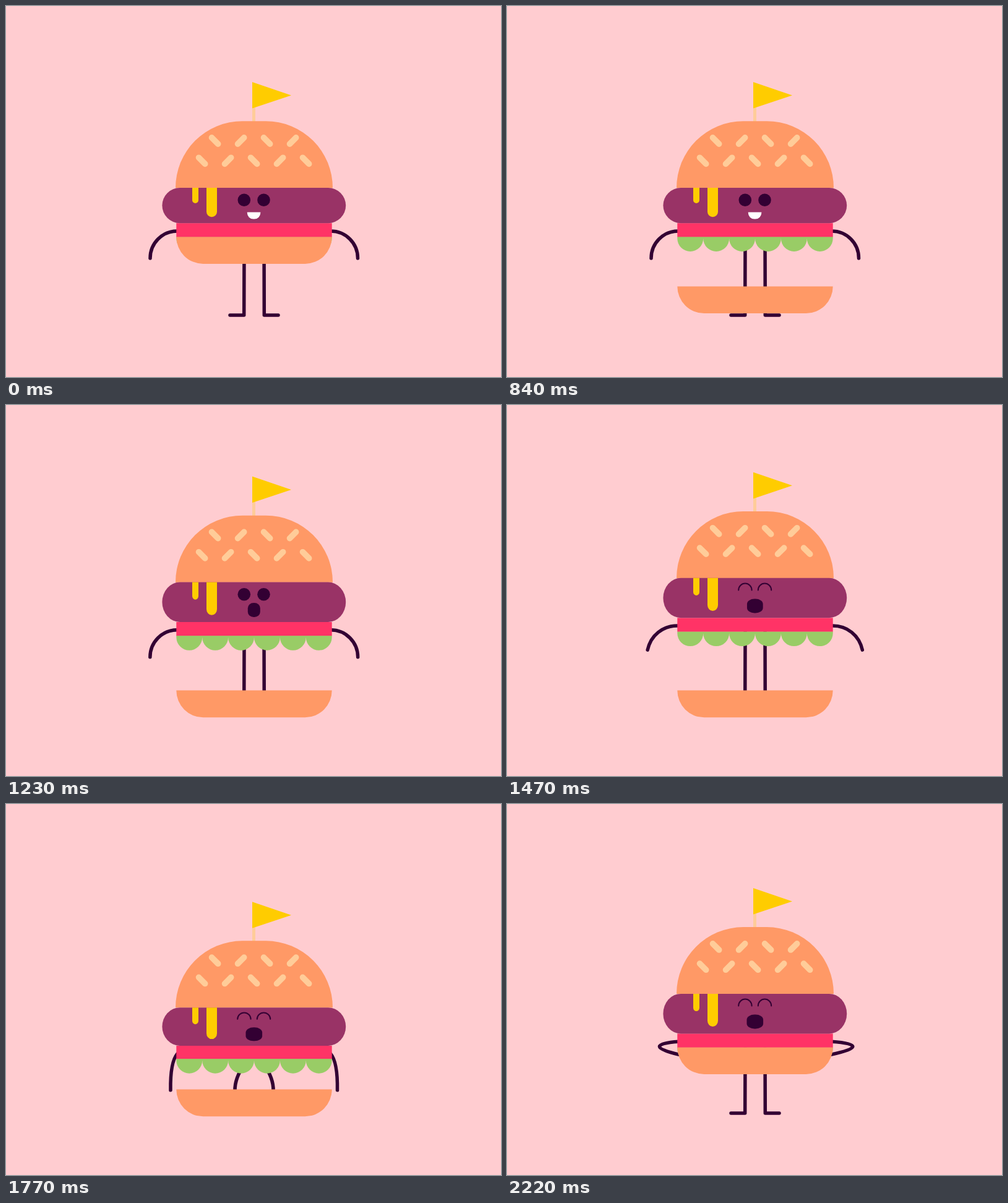
An HTML page for the animation above (2.7 s loop, 800x600 px).

```html
<!DOCTYPE html>
<html lang="en">
<head>
<meta charset="utf-8">
<title>Burger</title>
<style>
  html, body { margin: 0; height: 100%; overflow: hidden; background: #ffccd0; }
  svg { display: block; width: 100vw; height: 100vh; }
  .limb { fill: none; stroke: #330033; stroke-width: 5.5; stroke-linecap: round; stroke-linejoin: round; }
  .dark { fill: #330033; }
  .bread { fill: #ff9966; }
  .sauce { fill: #ffcc00; }
</style>
</head>
<body>
<svg viewBox="0 0 800 600">
  <g class="limb">
    <path id="legL"/><path id="legR"/>
    <path id="armL"/><path id="armR"/>
  </g>
  <path id="lettuce" fill="#99cc66"/>
  <path id="base" class="bread" d="M275.3 373.3H526.7a43.3 43.6 0 0 1-43.3 43.6H318.6a43.3 43.6 0 0 1-43.3-43.6z"/>
  <rect id="tomato" x="275.3" width="251.4" height="22.2" fill="#ff3366"/>
  <g id="top">
    <path d="M400.5 160V188" stroke="#ffcc99" stroke-width="5"/>
    <path class="sauce" d="M398 123L461 144.5L398 165.6z"/>
    <path class="bread" d="M274 294.2a108 108 0 0 1 108-108h38a108 108 0 0 1 108 108z"/>
    <path id="seeds" fill="none" stroke="#ffcc99" stroke-width="9.6" stroke-linecap="round"/>
  </g>
  <g id="patty">
    <rect x="252.4" width="296.8" height="57.2" rx="28.6" fill="#993366"/>
    <path class="sauce" d="M301 0h10v20a5 5 0 0 1-10 0zM324 0h17v38.7a8.5 8.5 0 0 1-17 0z"/>
  </g>
  <g id="face">
    <g id="open" class="dark">
      <circle cx="384.8" cy="19.8" r="10.3"/><circle cx="416.5" cy="19.8" r="10.3"/>
    </g>
    <path id="shut" fill="none" stroke="#330033" stroke-width="2" stroke-linecap="round"
      d="M374.2 19.6a10.7 10.9 0 0 1 21.4 0M405.8 19.6a10.7 10.9 0 0 1 21.4 0"/>
    <path id="smile" fill="#fff" d="M389.8 39.6h21.5v1a10 10 0 0 1-10 10h-1.5a10 10 0 0 1-10-10z"/>
    <rect id="mouth" class="dark" y="33.6" height="23" ry="8.5"/>
  </g>
</svg>
<script>
const LOOP = 2700, STEP = 30;
const $ = id => document.getElementById(id);
const set = (id, name, value) => $(id).setAttribute(name, value);
const show = (id, on) => set(id, 'visibility', on ? 'visible' : 'hidden');
const move = (y, scale = 1) => `translate(0 ${y}) scale(1 ${scale})`;

const ease = {
  in: p => p * p,
  out: p => p * (2 - p),
  both: p => p * p * (3 - 2 * p)
};

// Arm poses relative to the body: two control points, hand, extra width of the right arm.
const rest = [252, 364, 233, 384, 233, 408, 0];
const flung = [250, 362, 229, 377, 221, 399, 0];
const lower = [254, 366, 238.5, 384, 238.5, 410.5, 0];
const grab = [277.3, 375, 278, 395, 278.7, 429, 0];
const hips = [236, 367, 236, 375.5, 278, 385, 5];

// Each key: time, values, easing of the way there.
const tracks = {
  bun: [[540, [0]], [855, [88.3], 'in'], [910, [84], 'out'], [965, [88.3], 'in'], [2020, [88.3]], [2220, [20], 'both']],
  body: [[1220, [0]], [1370, [-16.5], 'both'], [1750, [39.7], 'both'], [2020, [39.7]], [2220, [20.2], 'both']],
  height: [[1080, [57.2]], [1220, [64.5], 'both']],
  squash: [[1650, [1]], [1860, [0.93], 'both'], [2020, [0.93]], [2220, [1], 'both']],
  bow: [[1480, [0]], [1620, [11], 'in'], [1800, [33], 'out'], [2020, [33]], [2200, [0], 'both']],
  arm: [[1220, rest], [1370, flung, 'both'], [1620, lower, 'both'], [1860, grab, 'both'], [2020, grab], [2220, hips, 'both']],
  mouth: [[1370, [20]], [1500, [26.6], 'both']]
};

function at(name, t) {
  const keys = tracks[name];
  const i = keys.findIndex(k => k[0] > t);
  if (i === 0) return keys[0][1];
  if (i < 0) return keys[keys.length - 1][1];
  const [t0, a] = keys[i - 1], [t1, b, kind = 'both'] = keys[i];
  const p = ease[kind]((t - t0) / (t1 - t0));
  return a.map((v, j) => v + (b[j] - v) * p);
}

function limbs(t, body) {
  const [bow] = at('bow', t);
  const leg = x => `M${x(385 + bow * 0.18)} ${374 + body}Q${x(384.8 - bow)} 461 ${x(384.7)} 500H${x(362)}`;
  set('legL', 'd', leg(x => x));
  set('legR', 'd', leg(x => 802 - x));

  const [ax, ay, bx, by, hx, hy, wide] = at('arm', t);
  const arm = (x, w) => `M${x(277)} ${364 + body}C${x(ax) + w} ${ay + body} ${x(bx) + w} ${by + body} ${x(hx)} ${hy + body}`;
  set('armL', 'd', arm(x => x, 0));
  set('armR', 'd', arm(x => 801.5 - x, wide));
}

function draw(t) {
  const [bun] = at('bun', t), [body] = at('body', t), [squash] = at('squash', t);
  const height = at('height', t)[0] * squash;
  const waist = 351.2 + body, brow = waist - height;
  limbs(t, body);
  set('base', 'transform', move(bun));
  set('tomato', 'transform', move(waist, squash));
  set('lettuce', 'transform', move(body - 22.2 * (1 - squash)));
  set('top', 'transform', move(brow - 294));
  set('patty', 'transform', move(brow, height / 57.2));

  const shocked = t >= 1080, straining = t >= 1410;
  set('face', 'transform', move(brow, shocked ? height / 64.5 : 1));
  show('open', !straining);
  show('shut', straining);
  show('smile', !shocked);
  show('mouth', shocked);
  const [w] = at('mouth', t);
  set('mouth', 'x', 400.8 - w / 2);
  set('mouth', 'width', w);
  set('mouth', 'rx', w * 0.47);
}

function seedRow(n, x, y) {
  return Array.from({ length: n }, (_, i) => {
    const s = i % 2 ? -1 : 1;
    return `M${x + i * 42 - 5.1} ${y - 5.1 * s}l10.2 ${10.2 * s}`;
  }).join('');
}

set('seeds', 'd', seedRow(4, 337.6, 218) + seedRow(5, 316.6, 250.3));
set('lettuce', 'd', Array.from({ length: 6 }, (_, i) =>
  `M${275.3 + i * 41.9} 373h41.9v3a20.95 20.95 0 0 1-41.9 0z`).join(''));

const start = performance.now();
function tick() {
  const t = (performance.now() - start) % LOOP;
  draw(Math.floor(t / STEP) * STEP);
  requestAnimationFrame(tick);
}
tick();
</script>
</body>
</html>
```
